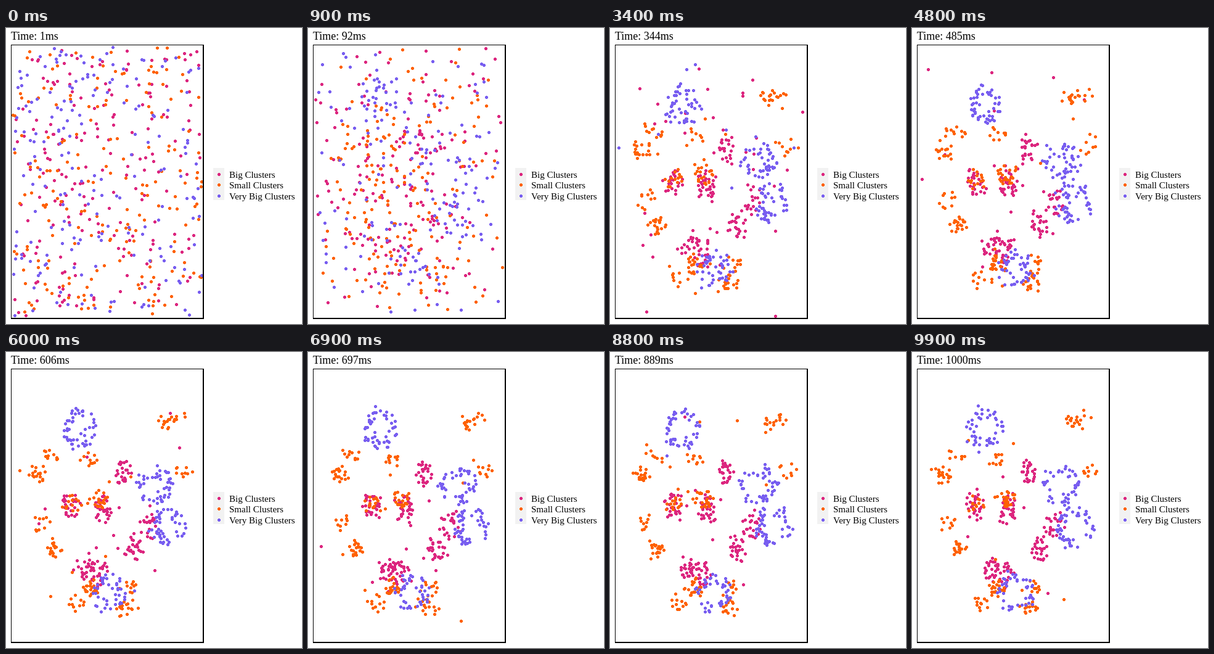
An HTML page with a canvas that plays this animation: 480 px wide and 480 px high, repeating every 10000 ms.

```html
<!DOCTYPE html>
<html lang="en">
<head>
<meta charset="utf-8">
<title>Clusters over time</title>
<style>
  html, body { margin: 0; width: 100%; height: 100%; overflow: hidden; background: #fff; }
  canvas { display: block; width: 480px; height: 480px; }
</style>
</head>
<body>
<canvas id="stage" width="480" height="480"></canvas>
<script>
const ctx = document.getElementById('stage').getContext('2d');
const STEPS = 100, STEP_MS = 100, DOTS = 188, HOMING = 8;
const BOX = { left: 11, right: 317, top: 30, bottom: 467 };
const SERIF = '"Liberation Serif", "Times New Roman", serif';

const GROUPS = [
  { name: 'Big Clusters', color: '#DC267F', rx: 13, ry: 21,
    wait: 14, ring: 0.1, loose: 0.7, escape: 0.003,
    centers: [[189, 195], [102, 250], [156, 256], [231, 281], [205, 320],
      [128, 354], [151, 361]] },
  { name: 'Small Clusters', color: '#FE6100', rx: 12, ry: 12,
    wait: 7, ring: 0.1, loose: 1.2, escape: 0.0025,
    centers: [[257, 115], [278, 111], [286, 192], [137, 175], [71, 167],
      [51, 197], [104, 247], [152, 238], [75, 320], [56, 279], [115, 407],
      [138, 382], [195, 384], [191, 415]] },
  { name: 'Very Big Clusters', color: '#785EF0', rx: 28, ry: 30,
    wait: 9, ring: 0.9, loose: 0.1, escape: 0.0008,
    centers: [[118, 123], [241, 217], [264, 283], [168, 391]] }
];

let seed = 20731;
function rnd() {
  seed = (seed + 0x6D2B79F5) | 0;
  let t = Math.imul(seed ^ (seed >>> 15), 1 | seed);
  t = (t + Math.imul(t ^ (t >>> 7), 61 | t)) ^ t;
  return ((t ^ (t >>> 14)) >>> 0) / 4294967296;
}
const gauss = () => Math.sqrt(-2 * Math.log(1 - rnd())) * Math.cos(2 * Math.PI * rnd());
const mix = (a, b, t) => a + (b - a) * t;

function bounce(v, lo, hi) {
  if (v < lo) v = 2 * lo - v;
  if (v > hi) v = 2 * hi - v;
  return Math.min(hi, Math.max(lo, v));
}

// Each dot starts anywhere and prefers the nearest of a few random clusters.
function makeDot(group) {
  const x = mix(BOX.left, BOX.right, rnd());
  const y = mix(BOX.top, BOX.bottom, rnd());
  const far = c => Math.hypot(c[0] - x, c[1] - y);
  const pick = () => group.centers[Math.floor(rnd() * group.centers.length)];
  const a = pick(), b = pick();
  const home = far(a) < far(b) ? a : b;
  return {
    x, y, home, angle: 2 * Math.PI * rnd(), u: rnd(),
    arrive: 3 + far(home) / 30 - group.wait * Math.log(1 - rnd() * 0.99)
  };
}

// Free dots wander, then home in on their cluster; caught ones jitter.
function move(dot, k, group) {
  const hollow = group.ring * k / STEPS;
  const spread = 1 + group.loose * Math.exp(-k / 22);
  const r = spread * mix(Math.sqrt(dot.u), 0.76 + 0.3 * dot.u, hollow);
  const tx = dot.home[0] + Math.cos(dot.angle) * group.rx * r;
  const ty = dot.home[1] + Math.sin(dot.angle) * group.ry * r;
  const left = dot.arrive - k;
  let pull = 0.22, noise = 2;
  if (left > HOMING) { pull = 0; noise = 12; }
  else if (left > 0) { pull = 1 / (left + 1); noise = 9 * Math.sqrt(left * pull); }
  dot.x = bounce(dot.x + (tx - dot.x) * pull + gauss() * noise, BOX.left, BOX.right);
  dot.y = bounce(dot.y + (ty - dot.y) * pull + gauss() * noise, BOX.top, BOX.bottom);
  if (left <= 0 && rnd() < group.escape) dot.arrive = k + 14 + 16 * rnd();
}

function simulate(group) {
  const dots = Array.from({ length: DOTS }, () => makeDot(group));
  const path = [];
  for (let k = 0; k < STEPS; k++) {
    if (k) dots.forEach(d => move(d, k, group));
    path.push(dots.map(d => [Math.round(d.x), Math.round(d.y)]));
  }
  return path;
}
GROUPS.forEach(g => { g.path = simulate(g); });

function drawDot(x, y) {
  ctx.fillRect(x - 2, y - 1, 5, 3);
  ctx.fillRect(x - 1, y - 2, 3, 5);
}

function drawText(text, x, y, size) {
  ctx.fillStyle = '#000';
  ctx.font = size + 'px ' + SERIF;
  ctx.fillText(text, x, y);
}

// One pixel at the top and left, two at the bottom and right.
function drawBorder() {
  ctx.fillStyle = '#000';
  ctx.fillRect(8, 27, 313, 1);
  ctx.fillRect(8, 27, 1, 445);
  ctx.fillRect(8, 470, 313, 2);
  ctx.fillRect(319, 27, 2, 445);
}

function drawLegend() {
  ctx.fillStyle = '#F2F2F2';
  ctx.fillRect(336, 227, 18, 52);
  GROUPS.forEach((g, i) => {
    const y = Math.round(237 + i * 17.4);
    ctx.fillStyle = g.color;
    drawDot(345, y);
    drawText(g.name, 362, y + 6, 15);
  });
}

function draw(k) {
  ctx.fillStyle = '#fff';
  ctx.fillRect(0, 0, 480, 480);
  drawText('Time: ' + Math.round(1 + k * 999 / 99) + 'ms', 8, 19, 18);
  for (const g of GROUPS) {
    ctx.fillStyle = g.color;
    for (const [x, y] of g.path[k]) drawDot(x, y);
  }
  drawBorder();
  drawLegend();
}

const start = performance.now();
let shown = -1;
function tick() {
  const k = Math.floor(Math.max(0, performance.now() - start) / STEP_MS) % STEPS;
  if (k !== shown) draw(shown = k);
  requestAnimationFrame(tick);
}
tick();
</script>
</body>
</html>
```
